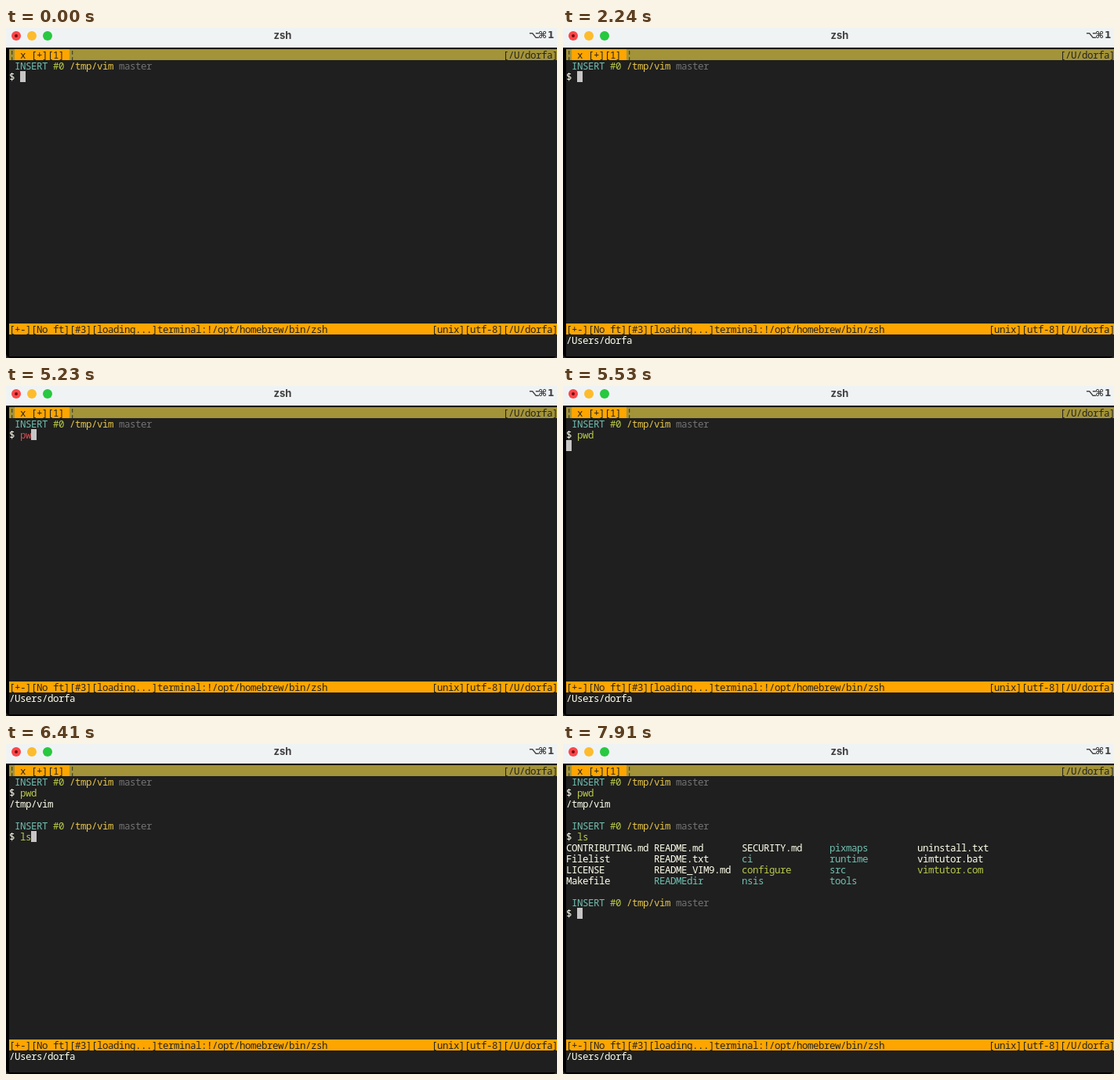
These frames come from a looping animation (703 by 421 pixels, 8 s). An HTML page:

```html
<!DOCTYPE html>
<html lang="en">
<head>
<meta charset="utf-8">
<title>Terminal session</title>
<style>
html, body { margin: 0; width: 100%; height: 100%; overflow: hidden; background: #000; }
svg { display: block; width: 703px; height: 421px; }
text { white-space: pre; }
.term { font: 12.5px "Noto Sans Mono", "DejaVu Sans Mono", monospace; letter-spacing: -.5px; fill: #ffffec; }
.title { font: 700 13px Inter, "Open Sans", sans-serif; fill: #404040; text-anchor: middle; }
.keys { font: 700 12px "DejaVu Sans", sans-serif; fill: #404040; }
.dark { fill: #262620; }
.cyan { fill: #70c0b1; }
.green { fill: #b9ca4a; }
.yellow { fill: #e7c547; }
.gray { fill: #737373; }
.red { fill: #d54e53; }
.prefix { text-decoration: underline; }

/* Percentages are milliseconds / 80. */
[style*="--show"], .cursor { animation: var(--show) 8s step-end infinite; }
.cursor { --show: cursor; fill: #c8c5c5; }
@keyframes cursor {
  0% { transform: translate(18px, 55px); }
  18.625% { transform: translate(11px, 391px); }
  24.25% { transform: translate(25px, 391px); }
  26.125% { transform: translate(32px, 391px); }
  28% { transform: translate(18px, 55px); }
  61.625% { transform: translate(25px, 55px); }
  65.375% { transform: translate(32px, 55px); }
  67.25% { transform: translate(39px, 55px); }
  69.125% { transform: translate(4px, 69px); }
  70.875% { transform: translate(18px, 111px); }
  78.375% { transform: translate(25px, 111px); }
  80.125% { transform: translate(32px, 111px); }
  83.875%, 100% { transform: translate(18px, 209px); }
}
@keyframes colon { 0%, 28% { opacity: 0; } 18.625% { opacity: 1; } 100% { opacity: 0; } }
@keyframes ex-pw { 0%, 28% { opacity: 0; } 24.25% { opacity: 1; } 100% { opacity: 0; } }
@keyframes ex-d { 0%, 28% { opacity: 0; } 26.125% { opacity: 1; } 100% { opacity: 0; } }
@keyframes ex-out { 0% { opacity: 0; } 28%, 100% { opacity: 1; } }
@keyframes sh-p { 0%, 65.375% { opacity: 0; } 61.625% { opacity: 1; } 100% { opacity: 0; } }
@keyframes sh-pw { 0%, 67.25% { opacity: 0; } 65.375% { opacity: 1; } 100% { opacity: 0; } }
@keyframes sh-pwd { 0% { opacity: 0; } 67.25%, 100% { opacity: 1; } }
@keyframes pwd-out { 0% { opacity: 0; } 70.875%, 100% { opacity: 1; } }
@keyframes sh-l { 0%, 80.125% { opacity: 0; } 78.375% { opacity: 1; } 100% { opacity: 0; } }
@keyframes sh-ls { 0% { opacity: 0; } 80.125%, 100% { opacity: 1; } }
@keyframes ls-out { 0% { opacity: 0; } 83.875%, 100% { opacity: 1; } }
@keyframes job-zsh { 0%, 98.875% { opacity: 1; } 89.5% { opacity: 0; } 100% { opacity: 1; } }
@keyframes job-ls { 0%, 98.875% { opacity: 0; } 89.5% { opacity: 1; } 100% { opacity: 0; } }
</style>
</head>
<body>
<svg viewBox="0 0 703 421">
  <defs>
    <g id="prompt">
      <text x="11" y="12"><tspan class="cyan">INSERT</tspan> <tspan class="green">#0</tspan> <tspan class="yellow">/tmp/vim</tspan> <tspan class="gray">master</tspan></text>
      <text x="4" y="26">$</text>
    </g>
  </defs>

  <!-- window -->
  <rect width="703" height="421" fill="#2b2b2b"/>
  <rect width="703" height="421" rx="6" fill="#000"/>
  <rect width="703" height="25" fill="#f0f3f4"/>
  <rect x="4" y="27" width="699" height="392" fill="#1f1f1f"/>
  <circle cx="13" cy="10" r="6" fill="#fb4649"/>
  <circle cx="13" cy="10" r="2" fill="#760d0c"/>
  <circle cx="33" cy="10" r="6" fill="#fdbc2e"/>
  <circle cx="53" cy="10" r="6" fill="#28c840"/>
  <g class="title">
    <text x="353" y="14" style="--show: job-zsh">zsh</text>
    <text x="353" y="14" style="--show: job-ls">ls</text>
  </g>
  <g class="keys">
    <text x="667" y="13">⌥</text>
    <text x="679" y="13">⌘</text>
    <text x="691" y="13">1</text>
  </g>

  <!-- tab line and status line -->
  <rect x="4" y="27" width="699" height="14" fill="#a39339"/>
  <rect x="11" y="27" width="70" height="14" fill="#ffa500"/>
  <rect x="4" y="377" width="699" height="14" fill="#ffa500"/>
  <g class="term">
    <g class="dark">
      <text x="4" y="39">¦ x [+][1] ¦</text>
      <text x="634" y="39">[/U/dorfa]</text>
      <text x="4" y="389">[+-][No ft][#3][loading...]terminal:!/opt/homebrew/bin/zsh</text>
      <text x="543" y="389">[unix][utf-8][/U/dorfa]</text>
    </g>

    <!-- command line -->
    <text x="4" y="403" style="--show: colon">:</text>
    <text x="11" y="403" style="--show: ex-pw">pw</text>
    <text x="25" y="403" style="--show: ex-d">d</text>
    <text x="4" y="403" style="--show: ex-out">/Users/dorfa</text>

    <!-- shell -->
    <use href="#prompt" y="41"/>
    <text x="18" y="67" class="prefix" style="--show: sh-p">p</text>
    <text x="18" y="67" class="red" style="--show: sh-pw">pw</text>
    <text x="18" y="67" class="green" style="--show: sh-pwd">pwd</text>
    <g style="--show: pwd-out">
      <text x="4" y="81">/tmp/vim</text>
      <use href="#prompt" y="97"/>
    </g>
    <text x="18" y="123" class="red" style="--show: sh-l">l</text>
    <text x="18" y="123" class="green" style="--show: sh-ls">ls</text>
    <g style="--show: ls-out">
      <text y="137"><tspan x="4">CONTRIBUTING.md</tspan><tspan x="116">README.md</tspan><tspan x="228">SECURITY.md</tspan><tspan x="340" class="cyan">pixmaps</tspan><tspan x="452">uninstall.txt</tspan></text>
      <text y="151"><tspan x="4">Filelist</tspan><tspan x="116">README.txt</tspan><tspan x="228" class="cyan">ci</tspan><tspan x="340" class="cyan">runtime</tspan><tspan x="452">vimtutor.bat</tspan></text>
      <text y="165"><tspan x="4">LICENSE</tspan><tspan x="116">README_VIM9.md</tspan><tspan x="228" class="green">configure</tspan><tspan x="340" class="cyan">src</tspan><tspan x="452" class="green">vimtutor.com</tspan></text>
      <text y="179"><tspan x="4">Makefile</tspan><tspan x="116" class="cyan">READMEdir</tspan><tspan x="228" class="cyan">nsis</tspan><tspan x="340" class="cyan">tools</tspan></text>
      <use href="#prompt" y="195"/>
    </g>
  </g>
  <rect class="cursor" width="7" height="14"/>
</svg>
</body>
</html>
```
